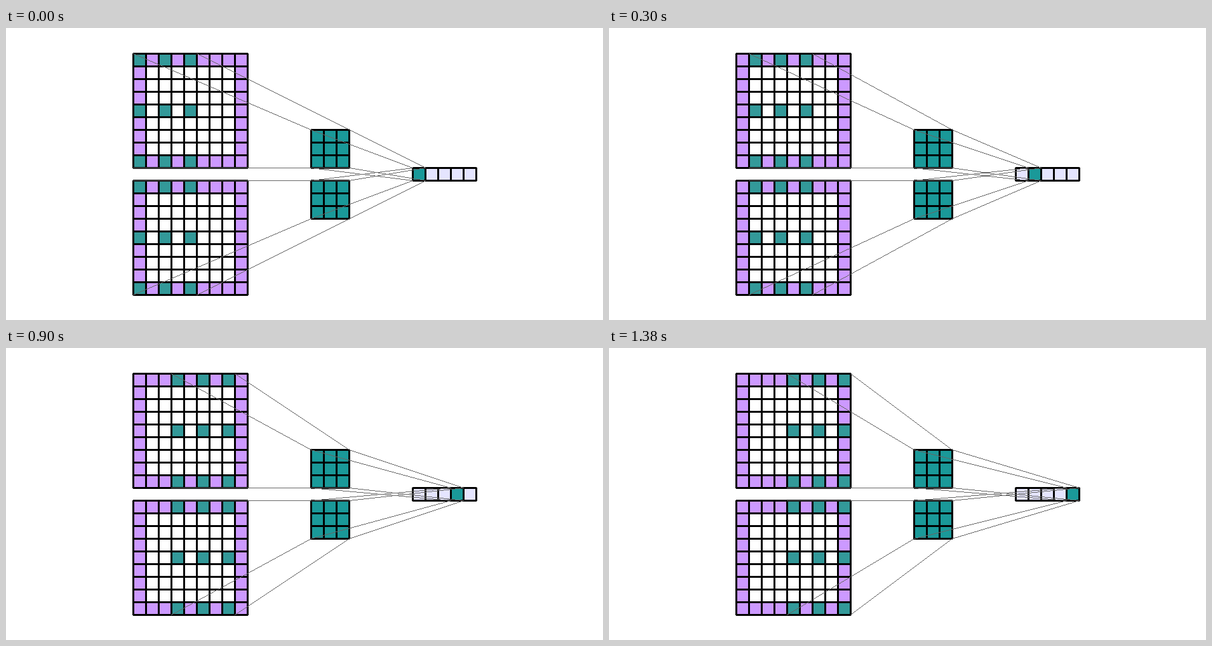
Recreate the animation shown at these times as an HTML page. Size 940 px wide and 460 px high, loop 1500 ms.

```html
<!DOCTYPE html>
<html lang="en">
<head>
<meta charset="utf-8">
<title>Dilated convolution</title>
<style>
  html, body { margin: 0; width: 100%; height: 100%; overflow: hidden; background: #fff; }
  svg { display: block; shape-rendering: crispEdges; }
  rect { stroke: #000; stroke-width: 3; stroke-linejoin: bevel; }
  path { fill: #666; }
</style>
</head>
<body>
<svg id="stage" width="940" height="460" viewBox="0 0 940 460"></svg>
<script>
const CELL = 20, STEP_MS = 300, STEPS = 5;
const PURPLE = '#cc99ff', WHITE = '#ffffff', SAMPLED = '#339999', KERNEL = '#1a9999', OUTPUT = '#e5e5ff';
const stage = document.getElementById('stage');

function add(name, attrs) {
  const el = document.createElementNS('http://www.w3.org/2000/svg', name);
  for (const key in attrs) el.setAttribute(key, attrs[key]);
  return stage.appendChild(el);
}

// Builds a grid and returns a function that recolours it for a step.
function grid(left, top, cols, rows, colour) {
  const cells = [];
  for (let row = 0; row < rows; row++) {
    for (let col = 0; col < cols; col++) {
      const rect = add('rect', {
        x: left + col * CELL + 0.5, y: top + row * CELL + 0.5, width: CELL, height: CELL
      });
      cells.push({ rect, col, row });
    }
  }
  return step => cells.forEach(c => c.rect.setAttribute('fill', colour(c.col, c.row, step)));
}

function inputColour(col, row, step) {
  const offset = col - step;
  if (row % 4 === 0 && offset >= 0 && offset <= 4 && offset % 2 === 0) return SAMPLED;
  return col % 8 === 0 || row % 8 === 0 ? PURPLE : WHITE;
}

const grids = [
  grid(200, 40, 9, 9, inputColour),
  grid(200, 240, 9, 9, inputColour),
  grid(480, 160, 3, 3, () => KERNEL),
  grid(480, 240, 3, 3, () => KERNEL),
  grid(640, 220, 5, 1, (col, row, step) => col === step ? KERNEL : OUTPUT)
];
const rays = add('path', {});

// A sliver exactly one pixel tall in every column, so the line stays thin and crisp.
function ray(x0, y0, x1, y1) {
  const half = (y1 - y0) / (x1 - x0) / 2;
  return `M${x0} ${y0 - half}L${x1 + 1} ${y1 + half}v1L${x0} ${y0 - half + 1}z`;
}

// Joins matching corners of two boxes given as [left, top, right, bottom].
function joinBoxes(a, b) {
  let d = '';
  for (const x of [0, 2]) {
    for (const y of [1, 3]) d += ray(a[x], a[y], b[x], b[y]);
  }
  return d;
}

function draw(step) {
  grids.forEach(paint => paint(step));
  const shift = step * CELL;
  const output = [640 + shift, 220, 660 + shift, 240];
  let d = '';
  for (const [inputTop, kernelTop] of [[40, 160], [240, 240]]) {
    const input = [200 + shift, inputTop, 300 + shift, inputTop + 180];
    const kernel = [480, kernelTop, 540, kernelTop + 60];
    d += joinBoxes(input, kernel) + joinBoxes(kernel, output);
  }
  rays.setAttribute('d', d);
}

let shown = -1;
function tick() {
  const step = Math.floor(performance.now() / STEP_MS) % STEPS;
  if (step !== shown) draw(shown = step);
  requestAnimationFrame(tick);
}
tick();
</script>
</body>
</html>
```
